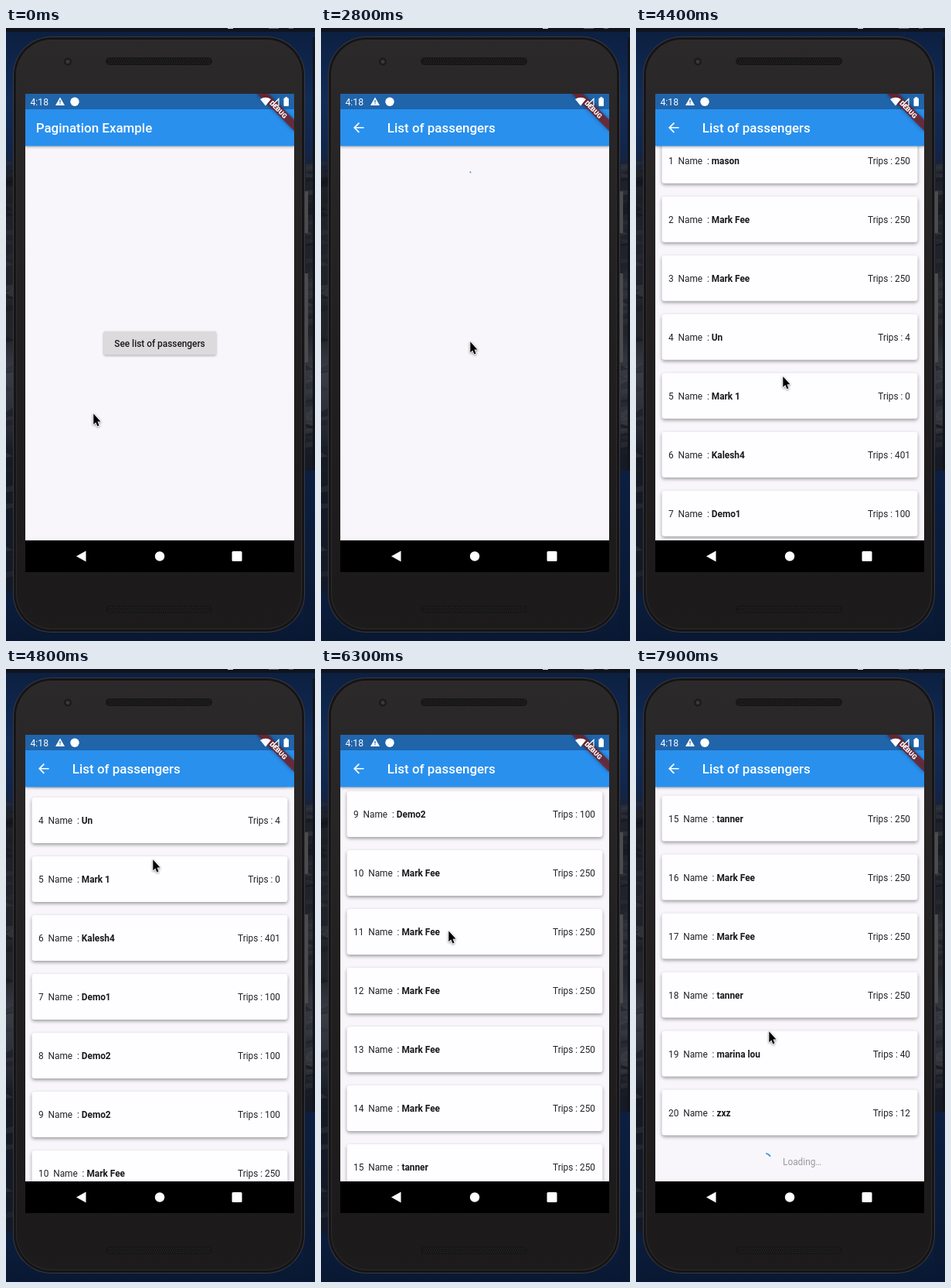
Recreate the animation shown at these times as an HTML page with a canvas. Size 400 by 792 pixels, loop 8 s.

```html
<!DOCTYPE html>
<html lang="en">
<head>
<meta charset="utf-8">
<title>Pagination Example</title>
<style>
  html, body { margin: 0; width: 100%; height: 100%; overflow: hidden; background: #0b1f3d; }
  canvas { display: block; width: 400px; height: 792px; }
</style>
</head>
<body>
<canvas id="stage" width="400" height="792"></canvas>
<script>
const LOOP = 8000;
const SCREEN = { x: 25, y: 85, w: 348, h: 618 };
const DP = 348 / 411;
const canvas = document.getElementById('stage');
let ctx = canvas.getContext('2d');

const common = ['Mark Fee', 250];
const passengers = [
  ['mason', 250], common, common, ['Un', 4], ['Mark 1', 0], ['Kalesh4', 401],
  ['Demo1', 100], ['Demo2', 100], ['Demo2', 100],
  common, common, common, common, common,
  ['tanner', 250], common, common, ['tanner', 250], ['marina lou', 40], ['zxz', 12]
];

// time, x, y of the pointer tip
const pointerKeys = [
  [0, 113, 498], [900, 113, 498], [1700, 193, 405], [3500, 193, 405], [3800, 190, 425],
  [4000, 190, 474], [4300, 190, 474], [4800, 190, 246], [5150, 178, 508], [5250, 176, 508],
  [5500, 172, 290], [5800, 168, 508], [6100, 168, 508], [6400, 164, 280], [6800, 162, 487],
  [7000, 164, 487], [7300, 170, 262], [7500, 172, 468], [8000, 172, 468]
];
// time, list offset
const scrollKeys = [
  [0, 0], [4300, 0], [4800, 228], [5200, 230], [5550, 478], [5800, 488],
  [6100, 488], [6500, 742], [6800, 759], [7000, 760], [7400, 1050], [7500, 1066.5], [8000, 1066.5]
];

const clamp = v => Math.max(0, Math.min(1, v));
const smooth = v => v * v * (3 - 2 * v);

function sample(keys, t) {
  const i = Math.max(1, keys.findIndex(k => k[0] > t));
  const a = keys[i - 1], b = keys[i];
  const p = smooth(clamp((t - a[0]) / (b[0] - a[0])));
  return a.slice(1).map((v, n) => v + (b[n + 1] - v) * p);
}

function rect(x, y, w, h, fill) {
  ctx.fillStyle = fill;
  ctx.fillRect(x, y, w, h);
}

function round(x, y, w, h, r, fill) {
  ctx.beginPath();
  ctx.roundRect(x, y, w, h, r);
  ctx.fillStyle = fill;
  ctx.fill();
}

function poly(points, fill) {
  ctx.beginPath();
  points.forEach(([x, y]) => ctx.lineTo(x, y));
  ctx.closePath();
  ctx.fillStyle = fill;
  ctx.fill();
}

function disc(x, y, r, fill) {
  ctx.beginPath();
  ctx.arc(x, y, r, 0, 7);
  ctx.fillStyle = fill;
  ctx.fill();
}

function text(str, x, y, size, weight = 400, color = '#222124', align = 'left') {
  ctx.font = `${weight} ${size}px Roboto, sans-serif`;
  ctx.textAlign = align;
  ctx.fillStyle = color;
  ctx.fillText(str, x, y);
  return ctx.measureText(str).width;
}

function shadow(color, blur, dy, draw) {
  ctx.save();
  ctx.shadowColor = color;
  ctx.shadowBlur = blur;
  ctx.shadowOffsetY = dy;
  draw();
  ctx.restore();
}

function gradient(y0, y1, stops) {
  const g = ctx.createLinearGradient(0, y0, 0, y1);
  stops.forEach(([at, color]) => g.addColorStop(at, color));
  return g;
}

function drawDesktop() {
  rect(0, 0, 400, 792, gradient(0, 792, [
    [0, '#0c1f40'], [.12, '#112c56'], [.2, '#12254a'], [.24, '#1d212a'], [.5, '#22242b'],
    [.56, '#393d46'], [.64, '#292d36'], [.7, '#151a25'], [.91, '#131926'],
    [.93, '#0b1d3c'], [1, '#091832']
  ]));
  // rough rock bands along the edges
  let seed = 7;
  const random = () => (seed = seed * 16807 % 2147483647) / 2147483647;
  for (let i = 0; i < 110; i++) {
    const left = random() < .5;
    const y = 170 + random() * (left ? 550 : 380), x = left ? 0 : 388;
    const tone = 14 + random() * 50 | 0;
    ctx.globalAlpha = .5;
    poly([[x, y], [x + 13, y + 8 - random() * 16], [x + 11, y + 5], [x, y + 7]],
      `rgb(${tone},${tone + 2},${tone + 8})`);
  }
  ctx.globalAlpha = 1;
  rect(386, 572, 14, 220, gradient(572, 792, [[0, '#0c1f40'], [1, '#091832']]));
  rect(397, 12, 3, 560, '#11141b');
  rect(0, 0, 400, 5, '#10131e');
  rect(287, 0, 7, 1, '#d9dae0');
  rect(340, 0, 13, 1, '#625f70');
  rect(366, 0, 6, 1, '#625f70');
}

function drawSpeaker(y) {
  round(129, y, 138, 10, 5, '#181718');
  for (let x = 133; x < 264; x += 3)
    for (let n = 0; n < 3; n++) rect(x + n % 2, y + 2 + n * 2.5, 1, 1, '#2c2a2b');
}

function drawPhone() {
  round(385, 211, 6, 54, 1, '#4b4a4d');
  round(385, 317, 6, 115, 1, '#4b4a4d');
  round(9, 11, 378, 770, 50, '#3b393c');
  round(10, 12, 376, 768, 49, '#151416');
  round(13, 15, 370, 762, 46, gradient(15, 777, [
    [0, '#2c292a'], [.1, '#2a2728'], [.5, '#211f20'], [.92, '#1c1a1b'], [1, '#1d1b1c']
  ]));
  ctx.strokeStyle = '#2d2b2c';
  ctx.lineWidth = 1;
  ctx.beginPath();
  ctx.roundRect(13.5, 15.5, 369, 761, 46);
  ctx.stroke();
  disc(80, 43.5, 5, '#1b1a1c');
  disc(80, 43.5, 2.5, '#373a42');
  drawSpeaker(38);
  drawSpeaker(746);
}

function drawNavigation() {
  rect(25, 662, 348, 41, '#000');
  poly([[91, 682.5], [103.5, 675.5], [103.5, 689.5]], '#fff');
  disc(199, 682.5, 6.2, '#fff');
  round(292.5, 676, 13, 13, 1.5, '#fff');
}

function drawStatus() {
  rect(25, 85, 348, 20, '#2064aa');
}

function drawStatusIcons() {
  text('4:18', 31.5, 100, 12.2, 400, '#fff');
  poly([[70, 89.5], [76, 100], [64, 100]], '#fff');
  rect(69.4, 93, 1.2, 3.5, '#2064aa');
  rect(69.4, 97.4, 1.2, 1.2, '#2064aa');
  disc(89, 95.3, 5.7, '#fff');
  ctx.beginPath();
  ctx.moveTo(336, 100.5);
  ctx.lineTo(329, 92);
  ctx.quadraticCurveTo(336, 87.5, 343, 92);
  ctx.fillStyle = '#fff';
  ctx.fill();
  ctx.strokeStyle = '#fff';
  ctx.lineWidth = 1.2;
  ctx.beginPath();
  ctx.moveTo(344.5, 100);
  ctx.lineTo(353, 91.5);
  ctx.lineTo(353, 100);
  ctx.closePath();
  ctx.stroke();
  round(359.5, 90.5, 6.5, 10.5, 1, '#fff');
  rect(361.4, 89.2, 2.8, 2, '#fff');
}

function drawBanner() {
  ctx.save();
  ctx.beginPath();
  ctx.rect(SCREEN.x, SCREEN.y, SCREEN.w, SCREEN.h);
  ctx.clip();
  ctx.translate(373, 85);
  ctx.rotate(Math.PI / 4);
  shadow('rgba(0,0,0,.5)', 5, 0, () =>
    rect(-40 * DP, 28 * DP, 80 * DP, 12 * DP, 'rgba(118,32,38,.8)'));
  text('DEBUG', 0, 37.6 * DP, 8.7, 900, '#fff', 'center');
  ctx.restore();
}

function drawAppBar(title, x) {
  shadow('rgba(0,0,0,.28)', 3, 1, () => rect(25, 105, 348, 47.5, '#2990ee'));
  text(title, x, 135, 20 * DP, 500, '#fff');
}

function drawHome(t) {
  rect(25, 105, 348, 557, '#f8f6fa');
  drawAppBar('Pagination Example', 38.7);
  const press = t > 1950 ? clamp((t - 1950) / 150) : 0;
  shadow('rgba(0,0,0,.32)', 3, 1, () => round(126.5, 392, 145.5, 30.5, 2, '#dcdadd'));
  if (press) round(126.5, 392, 145.5, 30.5, 2, `rgba(0,0,0,${.1 * press})`);
  text('See list of passengers', 199, 412, 14 * DP, 500, '#18171a', 'center');
}

function fastOutSlowIn(v) {
  let low = 0, high = 1, s = 0;
  for (let i = 0; i < 14; i++) {
    s = (low + high) / 2;
    const x = 1.2 * s * (1 - s) ** 2 + .6 * s * s * (1 - s) + s ** 3;
    if (x < v) low = s; else high = s;
  }
  return 3 * s * s * (1 - s) + s ** 3;
}

function drawSpinner(x, y, r, width, t, base) {
  const phase = (t / 1333 % 1 + 1) % 1;
  const head = fastOutSlowIn(clamp(phase * 2)) * 270;
  const tail = fastOutSlowIn(clamp(phase * 2 - 1)) * 270;
  const start = base + tail + t / 2222 * 360 + phase * 90;
  const rad = Math.PI / 180;
  ctx.beginPath();
  ctx.arc(x, y, r, start * rad, (start + Math.max(head - tail, 6)) * rad);
  ctx.strokeStyle = '#2990dd';
  ctx.lineWidth = width;
  ctx.stroke();
}

function drawCard(index, y) {
  const [name, trips] = passengers[index];
  shadow('rgba(0,0,0,.38)', 4, 2, () => round(33.5, y - 30, 331, 59, 3.5, '#fefdff'));
  const size = 14 * DP, base = y + 4.2;
  const width = text(`${index + 1}  Name  : `, 42, base, size);
  text(name, 42 + width, base, size, 700, '#19181b');
  text(`Trips : ${trips}`, 355, base, size, 400, '#222124', 'right');
}

function drawList(t) {
  rect(25, 105, 348, 557, '#f8f6fa');
  if (t < 3100) {
    drawSpinner(199, 200.5, 15.2, 2, t - 2800, -115);
  } else {
    const [offset] = sample(scrollKeys, t);
    passengers.forEach((_, i) => {
      const y = 196 + 76 * i - offset;
      if (y > 100 && y < 700) drawCard(i, y);
    });
    const y = 1703.5 - offset;
    if (y < 690) {
      drawSpinner(165, y, 11.7, 1.8, Math.max(0, t - 7770), -104);
      text('Loading…', 190, y + 4.2, 14 * DP, 400, '#99989b');
    }
  }
  drawAppBar('List of passengers', 85.8);
  ctx.save();
  ctx.translate(38.6, 118.6);
  ctx.scale(DP, DP);
  ctx.fillStyle = '#fff';
  ctx.fill(new Path2D('M20 11H7.83l5.59-5.59L12 4l-8 8 8 8 1.41-1.41L7.83 13H20z'));
  ctx.restore();
}

function drawPointer(x, y) {
  const outline = [[0, 0], [0, 15.5], [3.5, 12.4], [6, 18], [8.5, 17], [6.1, 11.4], [10.8, 11.2]];
  ctx.save();
  ctx.translate(x + .3, y + .3);
  ctx.scale(.85, .9);
  ctx.lineJoin = 'round';
  shadow('rgba(0,0,0,.35)', 3, 1, () => {
    poly(outline, '#fff');
    ctx.strokeStyle = '#fff';
    ctx.lineWidth = 1.8;
    ctx.stroke();
  });
  poly(outline, '#000');
  ctx.restore();
}

function makeBackdrop() {
  const layer = document.createElement('canvas');
  layer.width = 400;
  layer.height = 792;
  const main = ctx;
  ctx = layer.getContext('2d');
  drawDesktop();
  drawPhone();
  ctx = main;
  return layer;
}
const backdrop = makeBackdrop();

function drawScreen(t) {
  const enter = clamp((t - 2150) / 300);
  ctx.save();
  ctx.beginPath();
  ctx.rect(SCREEN.x, SCREEN.y, SCREEN.w, SCREEN.h);
  ctx.clip();
  drawStatus();
  if (enter < 1) drawHome(t);
  if (enter > 0) {
    ctx.save();
    ctx.globalAlpha = enter;
    ctx.translate(0, 145 * (1 - fastOutSlowIn(enter)));
    drawList(t);
    ctx.restore();
  }
  drawStatus();
  drawBanner();
  drawStatusIcons();
  drawNavigation();
  ctx.restore();
}

function frame(now) {
  const t = now % LOOP;
  ctx.drawImage(backdrop, 0, 0);
  drawScreen(t);
  drawPointer(...sample(pointerKeys, t));
  requestAnimationFrame(frame);
}
requestAnimationFrame(frame);
</script>
</body>
</html>
```
